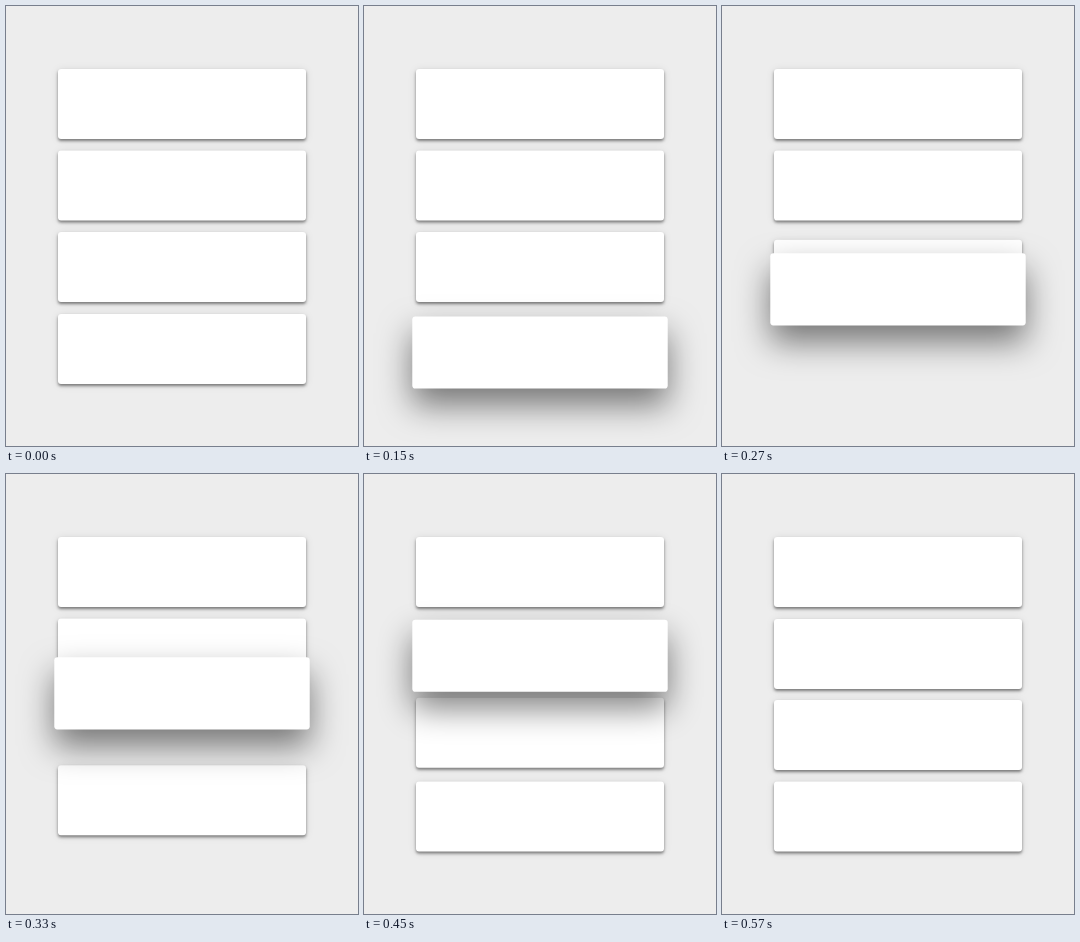
These frames come from a looping animation (352x440 px, 1300 ms). An HTML page:

```html
<!DOCTYPE html>
<html lang="en">
<head>
<meta charset="utf-8">
<title>Reordering cards</title>
<style>
  html, body { margin: 0; width: 100%; height: 100%; overflow: hidden; background: #ededed; }
  .card {
    position: absolute; left: 51.7px; top: 0; width: 248px; height: 70px;
    border-radius: 3px; background: #fff;
  }
</style>
</head>
<body>
<div class="card"></div>
<div class="card"></div>
<div class="card"></div>
<div class="card"></div>
<script>
const LOOP = 1300, STEP = 30, END = 570;
const SLOTS = [62.9, 144.6, 226.1, 307.9];
const cards = [...document.querySelectorAll('.card')];

const mix = (a, b, p) => a + (b - a) * p;

// CSS-style cubic Bézier easing, solved by bisection
function bezier(x1, y1, x2, y2) {
  const curve = (a, b, s) => 3 * (1 - s) ** 2 * s * a + 3 * (1 - s) * s * s * b + s ** 3;
  return x => {
    if (x <= 0) return 0;
    if (x >= 1) return 1;
    let low = 0, high = 1;
    for (let i = 0; i < 24; i++) {
      const mid = (low + high) / 2;
      if (curve(x1, x2, mid) < x) low = mid; else high = mid;
    }
    return curve(y1, y2, low);
  };
}
const standard = bezier(0.4, 0, 0.2, 1);
const ease = bezier(0.25, 0.1, 0.25, 1);
const during = (t, start, length, easing) => easing((t - start) / length);

function place(card, y, lift) {
  const drop = mix(2, 16, lift), blur = mix(3, 32, lift), alpha = mix(0.45, 0.5, lift);
  card.style.transform = `translateY(${y}px) scale(${mix(1, 1.03, lift)})`;
  card.style.boxShadow =
    `0 ${drop}px ${blur}px rgba(0,0,0,${alpha}), 0 1px 8px rgba(0,0,0,${mix(0.1, 0, lift)})`;
}

function draw(time) {
  const t = Math.min(END, Math.floor((time % LOOP) / STEP) * STEP);
  const raise = during(t, 0, 150, standard);
  const settle = during(t, 445, 125, standard);
  const travel = during(t, 172, 322, standard);

  place(cards[0], SLOTS[0], 0);
  place(cards[1], mix(SLOTS[1], SLOTS[2], during(t, 333, 150, ease)), 0);
  place(cards[2], mix(SLOTS[2], 307.4, during(t, 255, 150, ease)), 0);
  place(cards[3], mix(SLOTS[3] + 3.6 * raise, 145, travel), raise - settle);
}

const began = performance.now();
function tick() {
  draw(performance.now() - began);
  requestAnimationFrame(tick);
}
tick();
</script>
</body>
</html>
```
